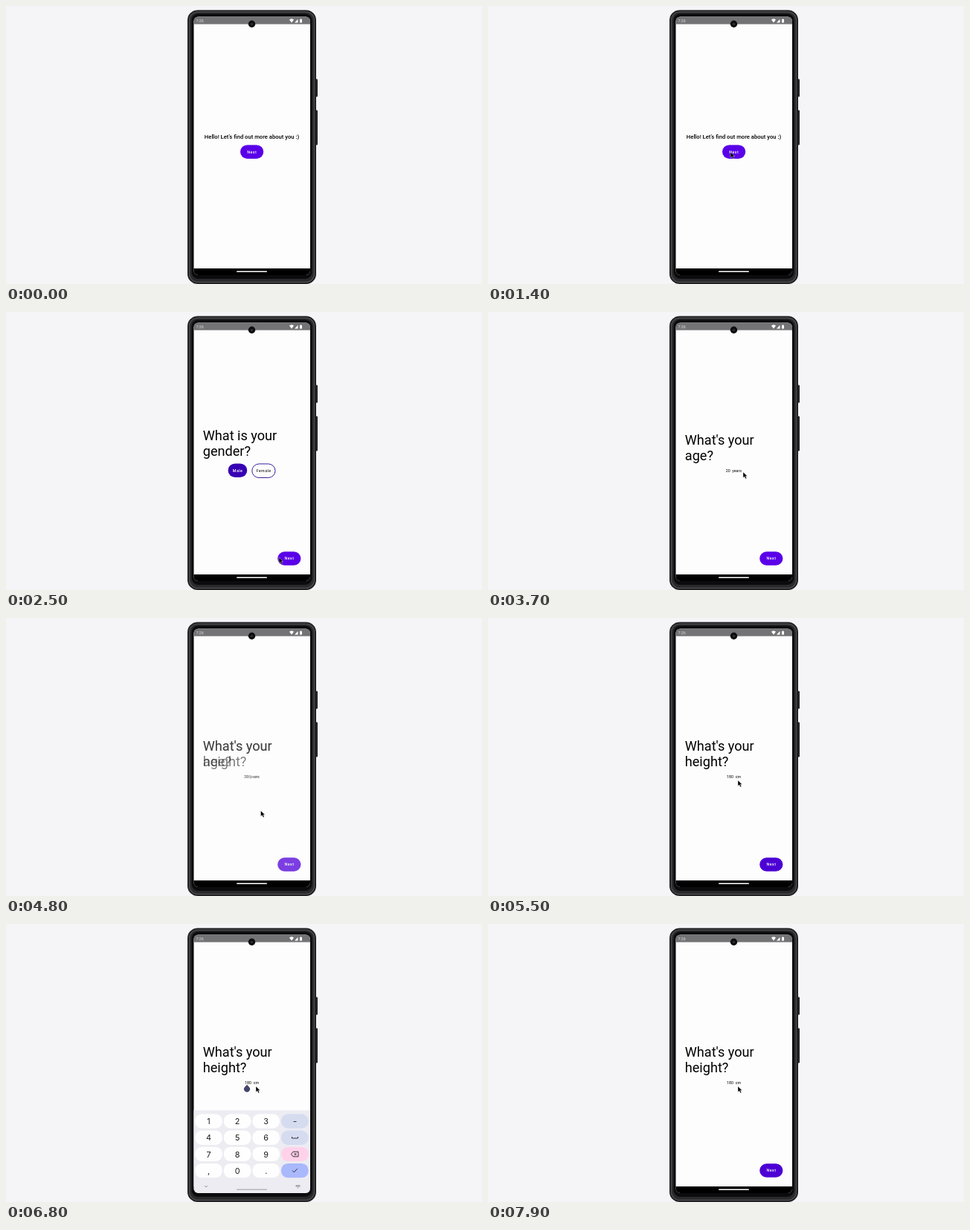
An HTML page that plays this animation: 640 px wide and 375 px high, repeating every 8 s.

```html
<!DOCTYPE html>
<html lang="en">
<head>
<meta charset="utf-8">
<title>Onboarding on a phone</title>
<style>
  html, body { margin: 0; width: 100%; height: 100%; overflow: hidden; background: #f5f5f7; }
  svg { display: block; width: 640px; height: 375px; font-family: Roboto, sans-serif; }
  .mid { text-anchor: middle; }
  .label { font-size: 5.3px; font-weight: 500; letter-spacing: .47px; }
  .hello { font-size: 7.65px; font-weight: 500; }
  .head { font-size: 18.1px; }
  .value { font-size: 5.3px; }
  .key { font: 10.8px Inter, sans-serif; fill: #1c1c1e; }
</style>
</head>
<body>
<svg viewBox="0 0 640 375">
  <defs>
    <clipPath id="glass"><rect x="252.5" y="14.5" width="156.5" height="348.5" rx="6"/></clipPath>
  </defs>

  <g fill="#232325">
    <rect x="415" y="98.500" width="4" height="24" rx="1"/>
    <rect x="415" y="140.500" width="4" height="47" rx="1"/>
  </g>
  <rect x="244" y="5.500" width="173" height="369.500" rx="13.500" fill="#1d1d1f"/>
  <rect x="246.500" y="8" width="168" height="364.500" rx="11" fill="#29292c" stroke="#4a4a4e" stroke-width="1.400"/>
  <rect x="249.500" y="10.500" width="162" height="357.500" rx="9" fill="#0b0b0d"/>

  <g clip-path="url(#glass)">
    <rect x="252" y="14" width="158" height="350" fill="#fdfdfd"/>
    <g id="screens"></g>
    <path id="handle" d="M324 216.800 L327 220 A4 4 0 1 1 321 220 Z" fill="#44446c"/>
    <rect x="252" y="354" width="158" height="10"/>
    <g id="keyboard">
      <rect x="252" y="251.500" width="158" height="114" fill="#ececf2"/>
      <g id="keys"></g>
      <g fill="none" stroke="#222" stroke-width=".9">
        <path d="M386.500 266.500h4"/>
        <path d="M384.500 287v2h8v-2"/>
        <path d="M383.500 310.500l2.500-3.300h7v6.600h-7zM387.500 309l3 3m0-3l-3 3"/>
        <path d="M385 332.500l2.300 2.300l4.300-4.600"/>
        <path d="M267 353l2 2l2-2" stroke="#8c8c94"/>
      </g>
      <path d="M389.500 352h6v2.500h-6zM391 355.500h3l-1.500 1.500z" fill="#a6a6b4"/>
    </g>
    <rect id="pill" x="310" y="357.400" width="41" height="1.500" rx=".7"/>
    <rect x="252" y="14" width="158" height="10.500" fill="#737375"/>
    <text x="255.500" y="22" font-size="5.300" fill="#dcdcdc">7:26</text>
    <g fill="#fff">
      <path d="M381 18.500q3-2.400 6 0l-3 4z"/>
      <path d="M388 22.500h4.500v-4.800z"/>
      <path d="M395 18h.8v-.7h1.400v.7h.8v4.500h-3z"/>
    </g>
  </g>
  <circle cx="330.500" cy="24.300" r="4.700" fill="#0d0d0f"/>
  <circle cx="330.500" cy="24.300" r="1.600" fill="#2e2e34"/>
  <path id="cursor" d="M0 0V7.500L1.800 6L3.300 9L4.700 8.300L3.300 5.500H5.700Z" stroke="#eee" stroke-width=".4"/>
</svg>
<script>
const LOOP = 8000;
const $ = id => document.getElementById(id);

const text = (s, x, y, cls, fill = '') =>
  `<text x="${x}" y="${y}" class="${cls}"${fill && ` fill="${fill}"`}>${s}</text>`;

const button = (s, x, y, w, fill, ink = '#fff', line = 'none') =>
  `<rect x="${x}" y="${y}" width="${w}" height="18.600" rx="9.300" fill="${fill}" stroke="${line}"/>` +
  text(s, x + w / 2 + .2, y + 11.2, 'mid label', ink);

const next = (x = 365.2, y = 323.2, fill = '#5a00e8') => button('Next', x, y, 31.2, fill);

const heading = (a, b, y) => text(a, 264.8, y, 'head') + text(b, 264.8, y + 21.3, 'head');

const screens = [
  text("Hello! Let's find out more about you :)", 330.5, 179.3, 'mid hello') + next(315, 187.4),
  heading('What is your', 'gender?', 172.8) +
    button('Male', 298.6, 204.4, 25.6, '#3700b3') +
    button('Female', 330.8, 204.9, 31.2, 'none', '#333', '#3a1c9c') + next(),
  heading("What's your", 'age?', 178.8) +
    text('20', 319.8, 215.6, 'value') + text('years', 328.3, 215.6, 'value') + next(),
  heading("What's your", 'height?', 178.8) +
    text('180', 321, 215.6, 'value') + text('cm', 332.8, 215.6, 'value') +
    next(365.2, 323.2, '#4c00d4')
];
$('screens').innerHTML = screens.map(s => `<g>${s}</g>`).join('');
const pages = [...$('screens').children];

// Number pad: three digit columns and one column of tinted action keys
const tints = ['#d6dcf0', '#d6dcf0', '#ffd2ea', '#aab8fc'];
$('keys').innerHTML = ['123', '456', '789', ',0.'].map((row, r) => {
  const y = 266 + r * 22.2;
  return [...row, ''].map((s, c) => {
    const x = 272.5 + c * 38.6;
    return `<rect x="${x - 18.3}" y="${y - 9.7}" width="36.600" height="19.400" rx="9" fill="${c < 3 ? '#fefefe' : tints[r]}"/>` +
      text(s, x, y + 4.1, 'mid key');
  }).join('');
}).join('');

const ease = (t, start, length) => {
  const p = Math.min(1, Math.max(0, (t - start) / length));
  return p * p * (3 - 2 * p);
};

const FADE = 700;
const fades = [1500, 2600, 4450];

// Pointer stops: time, x, y
const path = [
  [1000, 640, 290], [1350, 326, 197], [1650, 326, 197], [2350, 367, 331],
  [2800, 367, 331], [3500, 343, 216], [3800, 343, 216], [4200, 372, 331],
  [4500, 372, 331], [4800, 342.5, 260], [5300, 336, 219], [LOOP, 336, 219]
];

function pointer(t) {
  const i = Math.max(1, path.findIndex(p => t < p[0]));
  const [t0, x0, y0] = path[i - 1], [t1, x1, y1] = path[i];
  const k = ease(t, t0, t1 - t0);
  return [x0 + (x1 - x0) * k, y0 + (y1 - y0) * k];
}

function draw(t) {
  // The old page fades out while the new one fades in
  const shown = fades.map(start => ease(t, start, FADE));
  pages.forEach((page, i) => {
    const alpha = (i ? shown[i - 1] : 1) * (1 - (shown[i] || 0));
    page.setAttribute('opacity', alpha);
  });

  const up = ease(t, 5600, 300) - ease(t, 7000, 300);
  $('keyboard').setAttribute('transform', `translate(0 ${114 * (1 - up)})`);
  $('pill').setAttribute('fill', up > .3 ? '#b4b4bc' : '#fff');
  $('handle').setAttribute('visibility', t >= 5550 && t < 7000 ? 'visible' : 'hidden');

  $('cursor').setAttribute('visibility', t < path[0][0] ? 'hidden' : 'visible');
  $('cursor').setAttribute('transform', `translate(${pointer(t)})`);
}

const begin = performance.now();
function tick() {
  draw((performance.now() - begin) % LOOP);
  requestAnimationFrame(tick);
}
tick();
</script>
</body>
</html>
```
